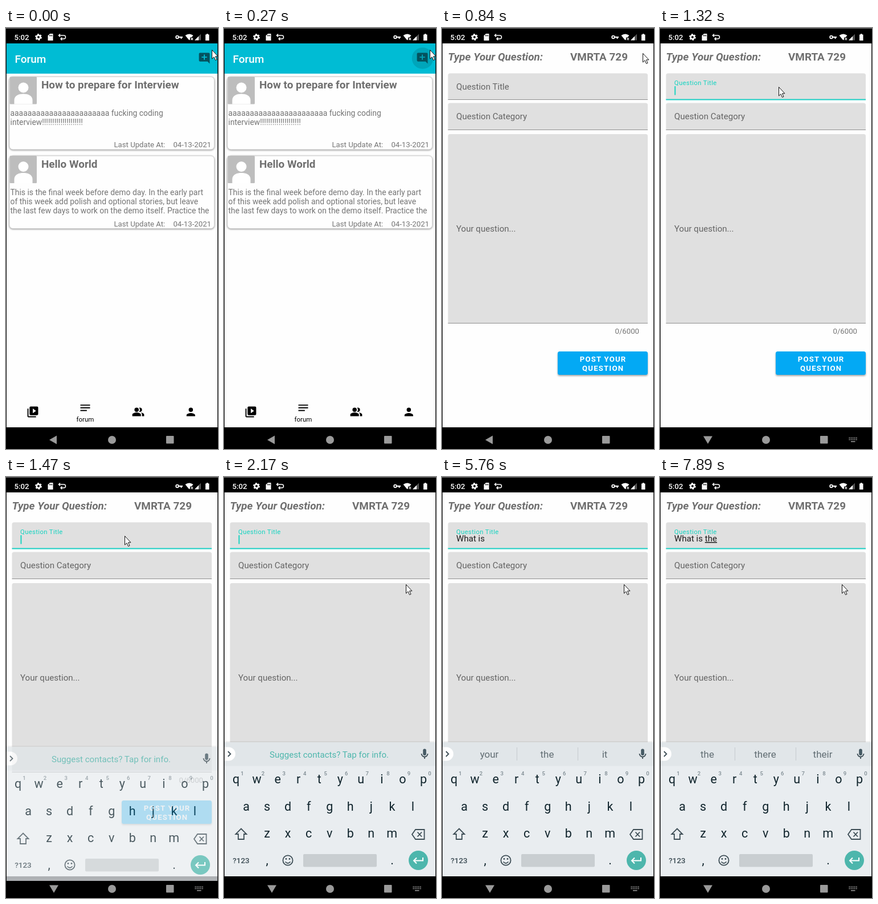
Animation of 372x738 px, one loop 8 s. Source, as an HTML page:

```html
<!DOCTYPE html>
<html lang="en">
<head>
<meta charset="utf-8">
<title>Forum app</title>
<style>
  html, body { margin: 0; width: 100%; height: 100%; overflow: hidden; background: #000; }
  svg { display: block; }
  text { font-family: Roboto, sans-serif; white-space: pre; }
  .mid { text-anchor: middle; }
  .end { text-anchor: end; }
  .head { font-size: 18.9px; font-weight: 700; fill: #6f6f6f; }
  .body { font-size: 13.9px; fill: #757575; }
  .small { font-size: 13.2px; fill: #757575; }
  .hint { font-size: 15.1px; fill: #646464; }
  .btn { font-size: 13.2px; font-weight: 700; letter-spacing: 1.18px; fill: #fff; }
  .key { font-size: 21.5px; fill: #10242c; }
  .digit { font-size: 9.5px; font-weight: 500; fill: #7d8a91; }
  .sugg { font-size: 17px; fill: #616d73; }
  .card { fill: #fefefe; stroke: #cdcdcd; filter: drop-shadow(0 1.5px 1.5px rgba(0, 0, 0, .4)); }
  .field { fill: #e0e0e0; }
  .line { fill: #8f8f8f; }
  .raised { fill: #03a9f4; filter: drop-shadow(0 2px 1.5px rgba(0, 0, 0, .35)); }
  .icon { fill: none; stroke: #3d4d55; stroke-width: 1.8; }
</style>
</head>
<body>
<svg width="372" height="738">
  <defs>
    <clipPath id="reveal"><rect id="revealBox" x="1" y="27" width="370" height="673"/></clipPath>
  </defs>
  <rect width="372" height="738"/>
  <rect width="372" height="1" fill="#777"/>

  <!-- status bar -->
  <g fill="#fff">
    <text x="14.5" y="21" font-size="13.2" font-weight="500">5:02</text>
    <g fill="none" stroke="#fff">
      <circle cx="57" cy="16" r="3.3" stroke-width="2.6"/>
      <circle cx="57" cy="16" r="5" stroke-width="1.9" stroke-dasharray="2.62 2.62"/>
      <path d="M95 10.500L92.500 13L95 15.500M93 13H101.500Q104.500 13 104.500 16T101.500 19H96M98.500 16.500L96 19L98.500 21.500" stroke-width="1.500"/>
      <circle cx="300.500" cy="16" r="2.300" stroke-width="1.800"/>
      <path d="M303 16H310M307.500 16V19" stroke-width="2"/>
    </g>
    <path d="M77 10H82.500V22H73.500V13.500Z"/>
    <path d="M76.500 12V14.500M78.500 12V14.500M80.500 12V14.500" stroke="#000"/>
    <path d="M314.500 13Q321.500 8 328.500 13L325.500 16.500H323V20L321.500 21.500Z"/>
    <path d="M324.500 17.500L328 21M328 17.500L324.500 21" stroke="#fff" stroke-width="1.200"/>
    <path d="M342 10.500V21.500H331Z" fill="#555"/>
    <path d="M338 14.500V21.500H331Z"/>
    <path d="M350 11.500H351.800V10.200H354.700V11.500H356.500V22H350Z"/>
  </g>

  <!-- system buttons -->
  <g fill="#9a9a9a">
    <path id="back" d="M76 722L89 714.500V729.500Z"/>
    <path id="down" d="M76 715.500H92L84 729Z"/>
    <circle cx="186" cy="722" r="7"/>
    <rect x="281" y="715" width="13.500" height="13.500" rx="1"/>
    <g id="switcher" fill="none" stroke="#858585" stroke-width="1.800">
      <path d="M331.500 718.500H346M331.500 721.500H346" stroke-dasharray="1.800 1.300"/>
      <path d="M335 725H342.500"/>
    </g>
  </g>

  <!-- forum list -->
  <g id="list">
    <rect x="1" y="27" width="370" height="673" fill="#fefefe"/>
    <rect x="1" y="27" width="370" height="53" fill="#00bcd4"/>
    <text x="15.500" y="61" font-size="19" font-weight="500" fill="#fff">Forum</text>
    <circle id="ripple" cx="348.500" cy="53" r="0"/>
    <path transform="translate(336.700 41.700) scale(.943)" fill="#04525e" d="M22 4c0-1.100-.9-2-2-2H4c-1.100 0-2 .9-2 2v12c0 1.100.9 2 2 2h14l4 4zM17 11h-4v4h-2v-4H7V9h4V5h2v4h4z"/>
    <g id="cards"></g>
    <g id="tabs">
      <path transform="translate(35.700 661.700) scale(.943)" d="M4 6H2v14c0 1.100.9 2 2 2h14v-2H4zM20 2H8c-1.100 0-2 .9-2 2v12c0 1.100.9 2 2 2h12c1.100 0 2-.9 2-2V4c0-1.100-.9-2-2-2zM12 14.500v-9l6 4.500z"/>
      <path transform="translate(127.700 654.500) scale(.943)" d="M3 18h12v-2H3zM3 6v2h18V6zM3 13h18v-2H3z"/>
      <path transform="translate(220.700 661.700) scale(.943)" d="M16.670 13.130C18 14 19 15.300 19 17v3h4v-3c0-2.200-3.600-3.500-6.330-3.870zM9 4a4 4 0 1 0 0 8 4 4 0 0 0 0-8zM15 12a4 4 0 0 0 0-8c-.5 0-.9.1-1.330.24a6 6 0 0 1 0 7.520c.4.14.86.24 1.330.24zM9 13c-2.700 0-8 1.300-8 4v3h16v-3c0-2.700-5.300-4-8-4z"/>
      <path transform="translate(313 661.700) scale(.943)" d="M12 4a4 4 0 1 0 0 8 4 4 0 0 0 0-8zM12 14c-2.700 0-8 1.300-8 4v2h16v-2c0-2.700-5.300-4-8-4z"/>
      <text class="mid" x="139" y="690" font-size="11.500">forum</text>
    </g>
    <rect id="dim" x="1" y="27" width="370" height="673" opacity=".105"/>
  </g>

  <!-- question form -->
  <g id="form">
    <g clip-path="url(#reveal)">
      <rect x="1" y="27" width="370" height="673" fill="#fefefe"/>
      <text class="head" x="10.500" y="57" font-style="italic">Type Your Question:</text>
      <text class="head" x="225" y="57">VMRTA 729</text>
      <path class="field" d="M10.500 126V83q0-3.500 3.500-3.500H357.500q3.500 0 3.500 3.500V126Z"/>
      <rect id="titleLine" x="10.500" width="350.500"/>
      <text id="label" class="hint" x="25">Question Title</text>
      <text id="typed" x="25" y="113" font-size="15.100" fill="#1c1c1c"><tspan id="done"></tspan><tspan id="live" text-decoration="underline"></tspan></text>
      <rect id="caret" y="102" width="1.900" height="15.500" fill="#12d3c0"/>
      <path class="field" d="M10.500 179V135q0-3.500 3.500-3.500H357.500q3.500 0 3.500 3.500V179Z"/>
      <rect class="line" x="10.500" y="178" width="350.500" height="1"/>
      <text class="hint" x="25" y="160">Question Category</text>
      <path class="field" d="M10.500 518V189.500q0-3.500 3.500-3.500H357.500q3.500 0 3.500 3.500V518Z"/>
      <rect class="line" x="10.500" y="517" width="350.500" height="1"/>
      <text class="hint" x="25" y="357">Your question...</text>
      <text class="small end" x="346" y="536">0/6000</text>
      <rect class="raised" x="203" y="567" width="158" height="41" rx="3.500"/>
      <text class="btn mid" x="282.600" y="585">POST YOUR</text>
      <text class="btn mid" x="282.600" y="601">QUESTION</text>
    </g>
  </g>

  <!-- soft keyboard -->
  <g id="board">
    <rect x="1" y="463" width="370" height="2" opacity=".06"/>
    <rect x="1" y="465" width="370" height="235" fill="#e9edf0"/>
    <rect x="1" y="465" width="370" height="41.500" fill="#e1e6e9"/>
    <path d="M1 473.500H8a12 12 0 0 1 0 24H1Z" fill="#fff"/>
    <path class="icon" d="M7 481L11.500 485.500L7 490" stroke-width="2"/>
    <text id="tip" class="mid" x="184.500" y="491.500" font-size="15.100" fill="#4db6ac">Suggest contacts? Tap for info.</text>
    <g id="bar">
      <path d="M131.500 474V497M238.500 474V497" stroke="#c5cbcf"/>
      <text class="sugg mid" x="83" y="492"></text>
      <text class="sugg mid" x="184.500" y="492"></text>
      <text class="sugg mid" x="285.500" y="492"></text>
    </g>
    <rect x="349.200" y="476.500" width="5.600" height="11.500" rx="2.800" fill="#455a64"/>
    <path class="icon" d="M346.500 485a5.500 5.500 0 0 0 11 0M352 490.500V494"/>
    <g id="keys"></g>
    <path class="icon" d="M30 616.500L39.500 626H35V635H25V626H20.500Z"/>
    <path class="icon" d="M336 618H351.500V635H336L330 626.500ZM339.500 622.500L347 630.500M347 622.500L339.500 630.500"/>
    <text class="mid" x="30" y="677" font-size="13.500" font-weight="500" fill="#3d4d55">?123</text>
    <text class="key mid" x="75.500" y="679">,</text>
    <text class="key mid" x="295" y="679">.</text>
    <circle class="icon" cx="112" cy="672" r="8.600"/>
    <path class="icon" d="M107.500 674.500q4.500 5 9 0"/>
    <circle cx="109" cy="669.500" r="1.400" fill="#3d4d55"/>
    <circle cx="115" cy="669.500" r="1.400" fill="#3d4d55"/>
    <rect x="139" y="661" width="129" height="22.500" rx="2" fill="#c9ced1"/>
    <circle cx="341" cy="672" r="17" fill="#4db6ac"/>
    <path d="M349 667V672.500H333M338 667.500L333 672.500L338 677.500" fill="none" stroke="#fff" stroke-width="2"/>
  </g>

  <path id="mouse" d="M.5.5V16L4 12.700L6.500 18.500L9 17.400L6.500 11.800H11Z" fill="#fff" stroke="#111"/>
</svg>

<script>
const $ = id => document.getElementById(id);
const LOOP = 8000;

function text(cls, x, y, str) {
  return `<text class="${cls}" x="${x}" y="${y}">${str}</text>`;
}

function card(y, title, lines) {
  return `<g transform="translate(0 ${y})">
    <rect class="card" x="6" y="0" width="359.5" height="127.500" rx="6"/>
    <rect x="6.500" y="0" width="47.500" height="48" rx="1.500" fill="#bdbdbd"/>
    <circle cx="30.500" cy="19" r="9" fill="#fff"/>
    <path d="M14.500 48v-7c0-8 8-11 16-11s16 3 16 11v7z" fill="#fff"/>
    ${text('head', 62, 20.5, title)}
    ${lines.map((s, i) => text('body', 7.5, 68.5 + i * 16.4, s)).join('')}
    ${text('small', 189.5, 123.5, 'Last Update At:')}
    ${text('small end', 360, 123.5, '04-13-2021')}
  </g>`;
}

$('cards').innerHTML =
  card(85.5, 'How to prepare for Interview',
    ['a'.repeat(23) + ' fucking coding', 'interview' + '!'.repeat(20)]) +
  card(224, 'Hello World', [
    'This is the final week before demo day. In the early part',
    'of this week add polish and optional stories, but leave',
    'the last few days to work on the demo itself. Practice the']);

const row = (chars, cls, x, y) =>
  [...chars].map((c, i) => text(cls + ' mid', x + i * 36.55, y, c)).join('');

$('keys').innerHTML =
  row('qwertyuiop', 'key', 21, 537) + row('1234567890', 'digit', 32, 523) +
  row('asdfghjkl', 'key', 39, 585) + row('zxcvbnm', 'key', 75.5, 632);

// Each step holds until the next and changes only what it names.
const steps = [
  [0, { mouse: [361, 38], ripple: [0, 0], list: 0, form: null, focus: 0, ime: false,
        board: null, done: '', live: '', caret: false, sugg: null }],
  [120, { ripple: [17.3, .07] }],
  [270, { ripple: [18.8, .12] }],
  [570, { ripple: [0, 0], list: -8, form: [14, 52] }],
  [690, { list: -14, form: [1, 0] }],
  [840, { list: null, form: [0, 0], mouse: [352, 44] }],
  [960, { mouse: [318, 62] }],
  [1080, { mouse: [258, 90] }],
  [1200, { mouse: [212, 104], focus: .5 }],
  [1320, { mouse: [208, 103], focus: 1, caret: true, ime: true }],
  [1470, { board: [8, .75] }],
  [1590, { board: [0, 1] }],
  [1740, { mouse: [229, 291], caret: false }],
  [1890, { mouse: [319, 188] }],
  [2170, { caret: true }],
  [2670, { caret: false }],
  [2820, { live: 'What', caret: true }],
  [3120, { done: 'What ', live: '' }],
  [3520, { caret: false }],
  [3670, { live: 'i', caret: true, sugg: ['i', 'I', "it's"] }],
  [3790, { live: 'is', sugg: ['is', "I'd", "it's"] }],
  [4220, { done: 'What is ', live: '' }],
  [4340, { sugg: ['your', 'the', 'it'] }],
  [4770, { caret: false }],
  [5360, { caret: true }],
  [5760, { caret: false }],
  [6350, { caret: true }],
  [6750, { caret: false }],
  [7030, { live: 't', caret: true, sugg: ['t', 'the', 'that'] }],
  [7180, { live: 'th', sugg: ['th', 'the', 'that'] }],
  [7460, { live: 'the', sugg: ['the', 'there', 'their'] }],
  [7890, { caret: false }]
];

const set = (id, attrs) => {
  for (const k in attrs) $(id).setAttribute(k, attrs[k]);
};
const show = (id, on) => { $(id).style.display = on ? '' : 'none'; };
const shift = (x, y) => `translate(${x} ${y})`;

function draw(s) {
  set('mouse', { transform: shift(...s.mouse) });
  set('ripple', { r: s.ripple[0], opacity: s.ripple[1] });

  show('list', s.list !== null);
  set('list', { transform: shift(0, s.list || 0) });
  show('dim', s.form);

  show('form', s.form);
  const [dy, cut] = s.form || [0, 0];
  set('form', { transform: shift(0, dy) });
  set('revealBox', { y: 27 + cut, height: 673 - cut });

  const f = s.focus;
  set('label', { y: 108 - 8.5 * f });
  $('label').style.cssText =
    `font-size:${15.1 - 3.8 * f}px;letter-spacing:${.37 * f}px;fill:${f ? '#12d3c0' : '#646464'}`;
  set('titleLine', f ? { y: 124.5, height: 2, fill: '#1dd0c5' } : { y: 125, height: 1, fill: '#8f8f8f' });

  $('done').textContent = s.done;
  $('live').textContent = s.live;
  show('caret', s.caret);
  const len = s.done || s.live ? $('typed').getComputedTextLength() : 0;
  set('caret', { x: 25.5 + len });

  show('back', !s.ime);
  show('down', s.ime);
  show('switcher', s.ime);

  show('board', s.board);
  const [by, alpha] = s.board || [0, 0];
  set('board', { transform: shift(0, by), opacity: alpha });
  show('tip', !s.sugg);
  show('bar', s.sugg);
  if (s.sugg) $('bar').querySelectorAll('text').forEach((el, i) => { el.textContent = s.sugg[i]; });
}

const start = performance.now();
let last = -1;

function tick() {
  const t = Math.max(0, performance.now() - start) % LOOP;
  const past = steps.filter(([at]) => at <= t);
  if (past.length !== last) {
    last = past.length;
    draw(Object.assign({}, ...past.map(([, change]) => change)));
  }
  requestAnimationFrame(tick);
}
tick();
</script>
</body>
</html>
```
